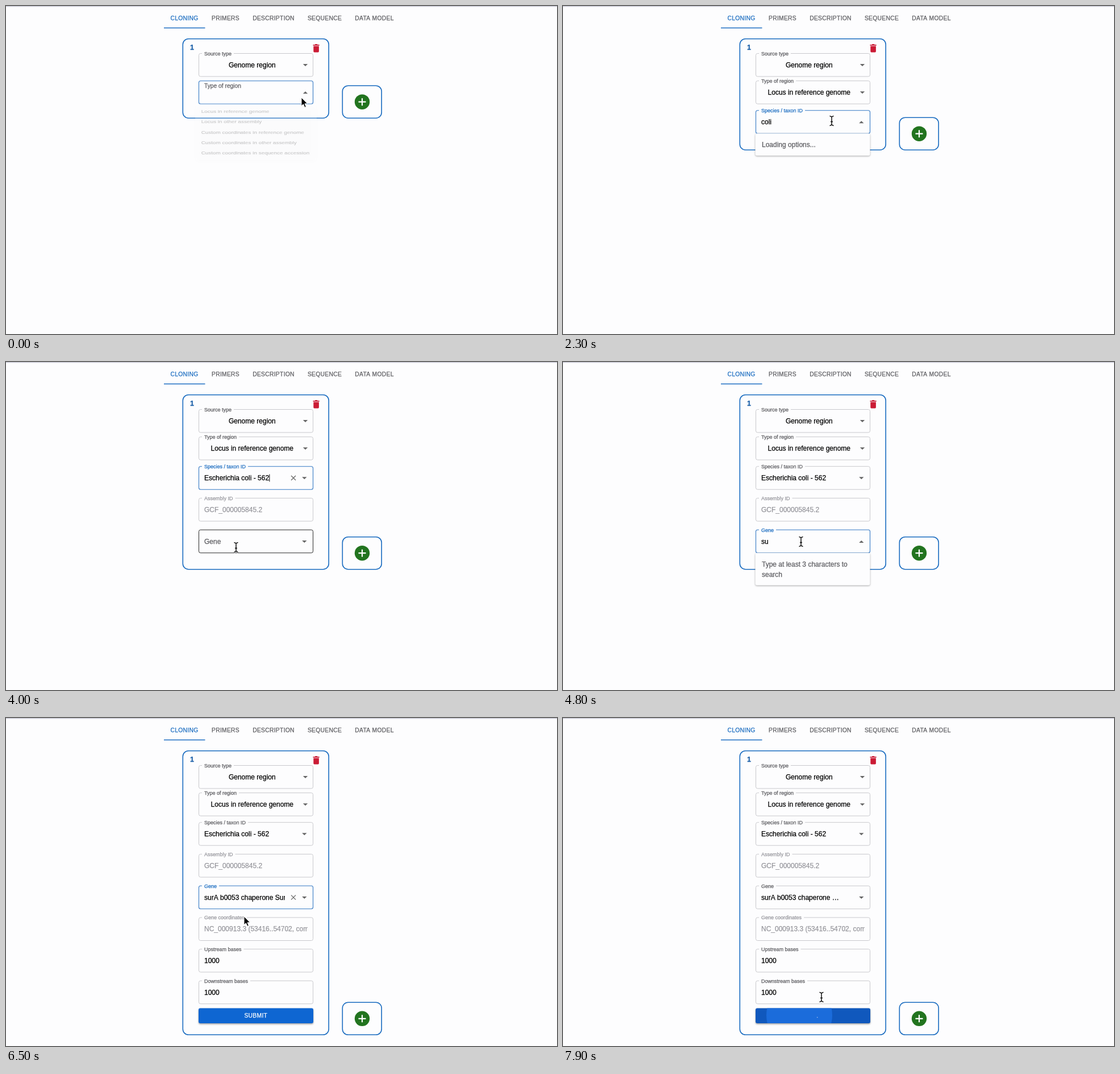
Animation of 970x577 px, one loop 8000 ms. Source, as an HTML page with a canvas:

```html
<!DOCTYPE html>
<html lang="en">
<head>
<meta charset="utf-8">
<title>Genome region form</title>
<style>
  html, body { margin: 0; width: 100%; height: 100%; overflow: hidden; background: #fdfdfe; }
  canvas { display: block; width: 970px; height: 577px; }
</style>
</head>
<body>
<canvas id="stage" width="970" height="577"></canvas>
<script>
const ctx = document.getElementById('stage').getContext('2d');
const LOOP = 8000, STEP = 100;
const FONT = '"Liberation Sans", Arial, sans-serif';
const PAPER = '#fdfdfe', BLUE = '#1a6cc0', INK = '#000', GREY = '#5c5c60', PALE = '#96969c', LINE = '#c8c8cc';
const LEFT = 339.5, RIGHT = 540.5, FIELD_H = 40.5;

// Moments of the story, in ms
const T = {
  pickType: 500, focusSpecies: 1300, typeSpecies: 1700, loadSpecies: 1900, listSpecies: 2500,
  pickSpecies: 3100, assembly: 3300, focusGene: 4200, typeGene: 4700, loadGene: 4900,
  listGene: 5400, pickGene: 6200, click: 7600, loading: 7800
};

const MENU = ['Locus in reference genome', 'Locus in other assembly', 'Custom coordinates in reference genome',
  'Custom coordinates in other assembly', 'Custom coordinates in sequence accession'];
const HINT = ['Type at least 3 characters to', 'search'];
const SPECIES = [['Escherichia coli - 562'], ['Escherichia coli K-12 - 83333'], ['Balantidium coli - 71585'],
  ['Escherichia coli O157:H7 str.', 'Sakai - 386585']];
const GENE = 'surA b0053 chaperone SurA';

// Pointer path: time, x, y
const PATH = [
  [0, 520, 161], [500, 452, 187], [600, 452, 187], [1000, 476, 200], [1100, 473, 203], [2300, 473, 202],
  [2600, 473, 202], [2900, 440, 242], [3300, 440, 242], [3800, 406, 318], [4000, 405, 326], [4300, 419, 316],
  [5700, 419, 316], [6000, 419, 349], [6500, 419, 349], [7000, 424, 440], [7300, 416, 522],
  [7700, 416, 522], [7900, 455, 491]
];

const clamp = v => Math.max(0, Math.min(1, v));
const ramp = (t, start, length) => clamp((t - start) / length);
const easeOut = x => 1 - (1 - x) * (1 - x);
const typed = (word, t, start) => word.slice(0, Math.max(0, Math.floor((t - start) / STEP) + 1));

function pointerAt(t) {
  let i = 0;
  while (i < PATH.length - 2 && PATH[i + 1][0] <= t) i++;
  const [ta, xa, ya] = PATH[i], [tb, xb, yb] = PATH[i + 1];
  const k = ramp(t, ta, tb - ta), s = k * k * (3 - 2 * k);
  return { x: xa + (xb - xa) * s, y: ya + (yb - ya) * s };
}

// A hairline outline gives the text its slightly heavier weight
function text(str, x, y, { size = 12, color = INK, align = 'left', bold = false, gap = 0 } = {}) {
  ctx.font = `${bold ? 'bold ' : ''}${size}px ${FONT}`;
  ctx.letterSpacing = gap + 'px';
  ctx.textAlign = align;
  ctx.fillStyle = ctx.strokeStyle = color;
  ctx.lineWidth = 0.25;
  ctx.fillText(str, x, y);
  ctx.strokeText(str, x, y);
  return ctx.measureText(str).width;
}

function box(x, y, w, h, r, { fill, stroke, line = 1 }) {
  ctx.beginPath();
  ctx.roundRect(x, y, w, h, r);
  if (fill) { ctx.fillStyle = fill; ctx.fill(); }
  if (stroke) { ctx.strokeStyle = stroke; ctx.lineWidth = line; ctx.stroke(); }
}

function shape(points, fill) {
  ctx.beginPath();
  points.forEach(([x, y]) => ctx.lineTo(x, y));
  ctx.closePath();
  ctx.fillStyle = fill;
  ctx.fill();
}

function strokes(lines, color, width) {
  ctx.beginPath();
  for (const [x1, y1, x2, y2] of lines) { ctx.moveTo(x1, y1); ctx.lineTo(x2, y2); }
  ctx.strokeStyle = color;
  ctx.lineWidth = width;
  ctx.stroke();
}

function paper(x, y, w, h, blur, depth = 0.35) {
  ctx.save();
  ctx.shadowColor = `rgba(0,0,0,${depth})`;
  ctx.shadowBlur = blur;
  ctx.shadowOffsetY = blur / 3;
  box(x, y, w, h, 3, { fill: PAPER });
  ctx.restore();
}

function header() {
  ctx.fillStyle = PAPER;
  ctx.fillRect(0, 0, 970, 577);
  ctx.fillStyle = '#c9c9d4';
  ctx.fillRect(0, 0, 970, 1);
  ctx.fillStyle = '#ececf2';
  ctx.fillRect(0, 1, 970, 1);
  const tabs = [['CLONING', 314], ['PRIMERS', 386.5], ['DESCRIPTION', 471], ['SEQUENCE', 561], ['DATA MODEL', 648.5]];
  tabs.forEach(([name, x], i) =>
    text(name, x, 25.3, { size: 10.3, color: i ? GREY : BLUE, align: 'center', gap: 0.3 }));
  ctx.fillStyle = BLUE;
  ctx.fillRect(278, 37.8, 72.5, 1.5);
}

function cards(bottom) {
  box(311.3, 57.7, 256.9, bottom - 57.7, 10, { stroke: BLUE, line: 1.6 });
  text('1', 324, 76.5, { size: 12.5, color: '#1a5fa8', bold: true });

  const red = '#cb1b35';
  ctx.fillStyle = red;
  ctx.fillRect(540.5, 68, 11.2, 1.6);
  ctx.fillRect(544, 67, 4.2, 1.5);
  box(541.3, 70.4, 9.6, 11, [0, 0, 1.6, 1.6], { fill: red });

  box(592.3, bottom - 57, 68.9, 57, 10, { stroke: BLUE, line: 1.6 });
  const y = bottom - 28.5;
  ctx.beginPath();
  ctx.arc(627, y, 13.2, 0, 7);
  ctx.fillStyle = '#22741f';
  ctx.fill();
  strokes([[620.5, y, 633.5, y], [627, y - 6.5, 627, y + 6.5]], '#fff', 2.2);
}

function arrow(x, y, up) {
  const d = up ? -2 : 2;
  shape([[x - 4.2, y - d], [x + 4.2, y - d], [x, y + d]], '#666');
}

function field(f, t, hover) {
  const { y, label, value = '', focus, off, shrink = 1 } = f, mid = y + 20.3;
  const color = off ? PALE : focus && shrink === 1 ? BLUE : GREY;
  const size = 12 - 3 * shrink;
  ctx.font = `${size}px ${FONT}`;
  ctx.letterSpacing = '0px';
  const notch = shrink > 0.6 ? ctx.measureText(label).width + 8 : 0;

  ctx.save();
  if (notch) {
    ctx.beginPath();
    ctx.rect(330, y - 5, 220, 60);
    ctx.rect(345, y - 3, notch, 6);
    ctx.clip('evenodd');
  }
  box(LEFT, y, RIGHT - LEFT, FIELD_H, 3,
    { stroke: focus ? '#3579c4' : hover ? '#2a2a2a' : LINE, line: focus ? 1.1 : 1 });
  ctx.restore();
  text(label, 349, mid - 20.3 * shrink + 4.2 - shrink, { size, color });

  if (f.select) {
    text(value, 433.3, mid + 3.9, { align: 'center' });
    arrow(527, mid + 0.3, f.open);
    return;
  }
  ctx.save();
  ctx.beginPath();
  ctx.rect(345, y, (f.clear ? 491 : 531) - 345, FIELD_H);
  ctx.clip();
  const w = text(value, 349, mid + 4, { color: off ? PALE : INK });
  if (focus && (t + 100) % 1000 < 400) {
    ctx.fillStyle = INK;
    ctx.fillRect(349.3 + w, mid - 6.5, 1, 13);
  }
  ctx.restore();
  if (f.combo) arrow(525.3, mid + 0.3, f.open);
  if (f.clear) strokes([[502, mid - 4, 510, mid + 4], [510, mid - 4, 502, mid + 4]], '#666', 1.3);
}

function popup(top, rows, pad, pointer, color = INK) {
  const isList = pad < 10;
  const rowHeight = r => r.length * 18 + (isList ? 9 : 0);
  const height = rows.reduce((h, r) => h + rowHeight(r), pad * 2);
  paper(338.5, top, 202, height, 3);
  let y = top + pad;
  for (const r of rows) {
    const h = rowHeight(r);
    if (isList && pointer.y > y && pointer.y < y + h) {
      ctx.fillStyle = '#f2f2f3';
      ctx.fillRect(338.5, y, 202, h);
    }
    r.forEach((s, i) => text(s, 350, y + (isList ? 4.5 : 0) + i * 18 + 13.2, { color }));
    y += h;
  }
}

// Menu grows from its top centre while fading, then fades away
function typeMenu(t, pointer) {
  const grow = ramp(t, -70, 240), fade = 1 - ramp(t, T.pickType, 250);
  if (fade <= 0) return;
  const s = 0.75 + 0.25 * grow, alpha = Math.pow(grow, 1.4) * fade;
  ctx.save();
  ctx.globalAlpha = alpha;
  ctx.translate(440, 172);
  ctx.scale(s, s * s);
  paper(-130, 0, 260, 147, 8, 0.35 * alpha);
  MENU.forEach((name, i) => {
    const y = 6 + i * 27;
    if (pointer.y - 172 > y && pointer.y - 172 < y + 27) {
      ctx.fillStyle = '#f1f1f2';
      ctx.fillRect(-130, y, 260, 27);
    }
    text(name, -117, y + 17.6);
  });
  ctx.restore();
}

function submit(t, pointer) {
  const hot = t >= T.click || (pointer.y > 510 && pointer.y < 537);
  ctx.save();
  ctx.shadowColor = 'rgba(0,0,0,.4)';
  ctx.shadowBlur = 3;
  ctx.shadowOffsetY = 1.5;
  box(339, 510.5, 202, 26.5, 3, { fill: hot ? '#1058bd' : '#0e66d2' });
  ctx.restore();
  if (t >= T.click) {
    ctx.save();
    ctx.beginPath();
    ctx.roundRect(339, 510.5, 202, 26.5, 3);
    ctx.clip();
    ctx.beginPath();
    ctx.arc(416, 523, 58 * (t - T.click) / 300, 0, 7);
    ctx.fillStyle = '#1b6cdb';
    ctx.fill();
    ctx.restore();
  }
  if (t < T.loading) {
    text('SUBMIT', 439.8, 526.8, { size: 10.3, color: '#fff', align: 'center', gap: 0.3 });
  } else {
    const a = 0.45 + (t - T.loading - 100) / 200;
    ctx.beginPath();
    ctx.arc(440, 523.5, 8.3, a - 0.14, a);
    ctx.strokeStyle = '#b5c9e8';
    ctx.lineWidth = 1.5;
    ctx.stroke();
  }
}

function drawPointer({ x, y }, beam) {
  ctx.save();
  ctx.translate(x, y);
  if (beam) {
    const bars = [[0, -7, 0, 7], [-2, 1.5, 2, 1.5], [0, -7, -3.5, -8.6], [0, -7, 3.5, -8.6],
      [0, 7, -3.5, 8.6], [0, 7, 3.5, 8.6]];
    strokes(bars, '#fff', 3.2);
    strokes(bars, '#111', 1.5);
  } else {
    ctx.lineJoin = 'round';
    shape([[0, 0], [0, 15], [3.4, 11.8], [5.9, 17.4], [8.4, 16.3], [6, 10.9], [10.6, 10.7]], '#080808');
    ctx.strokeStyle = '#fff';
    ctx.lineWidth = 1;
    ctx.stroke();
  }
  ctx.restore();
}

function fieldsAt(t) {
  const after = k => t >= T[k];
  const on = (from, to) => t >= from && t < to;
  const species = on(T.focusSpecies, T.focusGene), gene = on(T.focusGene, T.click);
  const list = [
    { y: 83.5, label: 'Source type', value: 'Genome region', select: true },
    { y: 131.7, label: 'Type of region', value: after('pickType') ? MENU[0] : '', select: true,
      focus: t < T.focusSpecies, open: t < T.pickType, shrink: easeOut(ramp(t, -70, 200)) }
  ];
  if (after('pickType')) list.push({
    y: 183.7, label: 'Species / taxon ID', combo: true, focus: species,
    value: after('pickSpecies') ? SPECIES[0][0] : typed('coli', t, T.typeSpecies),
    open: on(T.focusSpecies, T.pickSpecies), clear: species && after('pickSpecies'),
    shrink: easeOut(ramp(t, T.focusSpecies - 50, 200))
  });
  if (after('assembly')) list.push(
    { y: 239.5, label: 'Assembly ID', value: 'GCF_000005845.2', off: true },
    { y: 295.3, label: 'Gene', combo: true, focus: gene, open: on(T.focusGene, T.pickGene),
      value: after('click') ? 'surA b0053 chaperone …' : after('pickGene') ? GENE : typed('surA', t, T.typeGene),
      clear: gene && after('pickGene'), shrink: easeOut(ramp(t, T.focusGene - 50, 200)) });
  if (after('pickGene')) list.push(
    { y: 351, label: 'Gene coordinates', value: 'NC_000913.3 (53416..54702, complement)', off: true },
    { y: 406.5, label: 'Upstream bases', value: '1000' },
    { y: 462.3, label: 'Downstream bases', value: '1000' });
  return list;
}

function draw(t) {
  const pointer = pointerAt(t);
  const fields = fieldsAt(t);
  const over = f => pointer.y > f.y && pointer.y < f.y + FIELD_H && !f.off;
  const menuOpen = t < T.pickType + 250;
  const bottom = t < T.pickType ? 197.2 : t < T.assembly ? 253.2 : t < T.pickGene ? 364.7 : 557.3;

  header();
  cards(bottom);
  fields.forEach(f => field(f, t, over(f) && !menuOpen && t < T.loading));
  if (t >= T.pickGene) submit(t, pointer);
  typeMenu(t, pointer);

  const open = fields.find(f => f.combo && f.open);
  if (open) {
    const gene = open.label === 'Gene', top = open.y + FIELD_H;
    if (t < (gene ? T.loadGene : T.loadSpecies)) popup(top, [HINT], 10.5, pointer, GREY);
    else if (t < (gene ? T.listGene : T.listSpecies)) popup(top, [['Loading options...']], 10.5, pointer, GREY);
    else popup(top, gene ? [[GENE]] : SPECIES, 6, pointer);
  }
  drawPointer(pointer, !menuOpen && fields.some(f => !f.select && over(f)));
}

const start = performance.now();
function tick(now) {
  const t = Math.max(0, now - start) % LOOP;
  draw(Math.floor(t / STEP) * STEP);
  requestAnimationFrame(tick);
}
draw(0);
requestAnimationFrame(tick);
</script>
</body>
</html>
```
